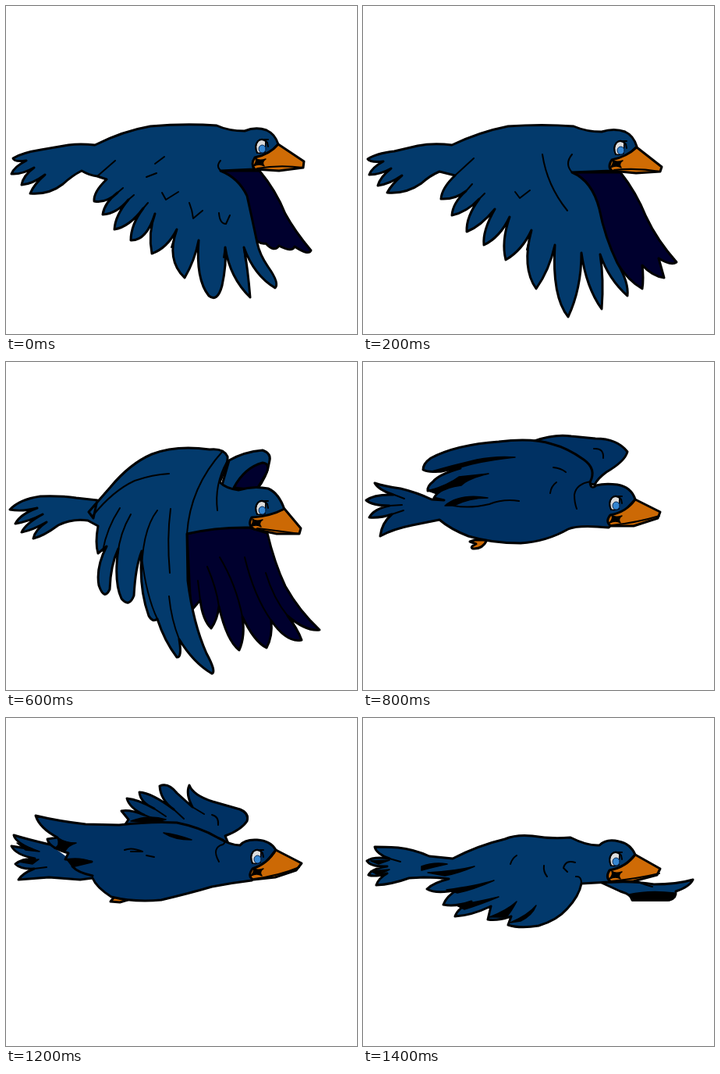
These frames come from a looping animation (450x420 px, 1600 ms). An HTML page:

```html
<!DOCTYPE html>
<html lang="en">
<head>
<meta charset="utf-8">
<title>Flying bird</title>
<style>
html, body { margin: 0; width: 100%; height: 100%; overflow: hidden; background: #fff; }
svg { display: block; width: 100vw; height: 100vh; }
path, ellipse { stroke: #000; stroke-width: 3; stroke-linejoin: round; stroke-linecap: round; }
.pose { visibility: hidden; animation: show 1.6s step-end infinite; animation-delay: calc(var(--i) * .2s - 1.6s); }
.skin { fill: var(--blue); }
.under { fill: #00002e; }
.beak { fill: var(--orange); }
.ink { fill: none; stroke-width: 2; }
.gap { fill: #000; stroke-width: 1.5; }
.white { fill: #ddd; stroke-width: 1.6; }
.iris { fill: #3585d0; stroke: #06244e; stroke-width: 1; }
@keyframes show {
  0% { visibility: visible; }
  12.5%, 100% { visibility: hidden; }
}
</style>
</head>
<body>
<svg viewBox="0 0 450 420" preserveAspectRatio="none">
<defs>
  <g id="eye">
    <path class="white" d="M-5 8Q-9 -1 -4 -7Q1 -12 6 -7L5 7Q0 9 -5 8Z"/>
    <ellipse class="iris" cx="1.5" cy="3" rx="4.5" ry="5"/>
    <path class="ink" d="M-5 8Q-9 -1 -4 -7Q2 -12 8 -5L9 0M4 -9L9 -9"/>
  </g>
  <path id="smile" class="gap" d="M-3 -5Q1 -1 10 -4Q4 0 8 5Q2 1 -6 5Q-1 0 -3 -5Z"/>
</defs>

<!-- downstroke -->
<g class="pose" style="--i:0;--blue:#033a6c;--orange:#cf6c06">
  <path class="under" d="M275 211L325 211Q346 236 358 266Q370 288 391 313Q388 320 370 308Q367 316 350 307Q344 316 333 304Q324 306 316 294Q308 245 275 211Z"/>
  <path class="skin" d="M114 178Q95 176 80 178L45 184Q20 188 9 195Q10 200 26 198Q10 206 7 215Q20 216 36 207Q22 217 20 229Q34 228 50 216Q36 228 31 240Q55 242 73 228Q85 217 97 211Q107 217 117 218L129 222Q112 238 113 250Q128 253 143 239Q126 252 124 267Q142 266 157 248Q140 268 139 286Q158 283 176 259Q160 280 160 300Q180 301 191 266Q182 290 187 317Q207 310 219 286Q205 325 229 348Q242 326 247 300Q243 350 260 371Q271 380 277 358Q283 330 281 309Q287 348 313 373Q310 336 305 309Q318 345 345 361Q351 355 336 334Q325 318 322 303Q315 270 309 243Q298 220 275 211L318 209L349 177Q345 164 334 159Q320 154 306 160Q285 160 270 153Q230 150 185 154Q150 160 114 178Z"/>
  <path class="beak" d="M349 177L382 199L381 207L350 211L319 209Q313 203 319 194Q338 190 349 177Z"/>
  <path class="ink" d="M322 208Q350 203 381 207M275 198Q268 206 277 212M117 218L140 198M191 202L203 193M180 219L193 214M200 239L205 248L221 238M235 252Q239 262 240 272L252 262M273 265Q274 279 282 279L287 268M219 286L212 309M281 309L279 322M305 309L307 326M143 239L150 233M157 248L164 242M176 259L182 252"/>
  <use href="#eye" x="327" y="180"/><use href="#smile" x="323" y="200"/>
</g>

<!-- wings deepest -->
<g class="pose" style="--i:1;--blue:#033a6c;--orange:#d06c04">
  <path class="under" d="M268 213L330 213Q350 238 363 270Q377 300 402 328Q395 333 379 323Q383 337 386 348Q371 346 358 332Q360 350 358 362Q340 352 325 328Q290 285 268 213Z"/>
  <path class="skin" d="M114 178Q90 175 70 179L40 186Q16 189 6 196Q10 201 26 199Q11 207 8 216Q22 216 36 208Q22 219 19 230Q34 228 50 217Q37 228 31 239Q55 241 75 227Q86 217 98 212L118 217Q101 233 100 247Q118 248 132 237Q115 252 114 268Q133 264 149 247Q132 270 133 289Q151 282 169 260Q153 288 155 306Q176 296 188 270Q177 302 183 325Q204 313 216 287Q203 335 222 362Q239 338 246 306Q242 372 263 398Q280 362 280 316Q286 360 306 388Q309 350 304 318Q315 350 339 371Q341 354 326 329Q310 296 303 260Q294 224 268 213L318 211L351 180Q347 166 336 161Q322 156 306 161Q286 161 270 154Q230 151 186 154Q150 161 114 178Z"/>
  <path class="beak" d="M351 181L383 206L381 212L350 214L319 211Q313 206 319 197Q338 193 351 181Z"/>
  <path class="ink" d="M322 210Q350 207 381 212M268 190Q258 202 268 213M118 217L142 195M230 190Q236 230 262 262M195 238L201 246L214 236M216 287L210 312M246 306L246 325M280 316L280 330M304 318L306 334M132 237L140 228M149 247L156 240"/>
  <use href="#eye" x="329" y="182"/><use href="#smile" x="323" y="202"/>
</g>

<!-- sweeping forward -->
<g class="pose" style="--i:2;--blue:#033a6c;--orange:#d86e00">
  <path class="skin" d="M270 149Q285 139 303 135Q322 140 336 153Q347 161 350 174L300 172Z"/>
  <path class="under" d="M298 154Q315 146 333 152Q345 159 349 171Q322 164 298 160Z"/>
  <path class="under" d="M262 218Q300 211 320 213L358 218Q370 242 379 268Q388 298 405 320Q396 322 386 312Q390 324 389 334L379 328Q386 338 386 346Q375 343 366 331Q369 353 363 377Q344 368 332 345Q290 290 262 218Z"/>
  <path class="skin" d="M112 180Q85 176 62 180L32 188Q14 190 6 197Q8 203 24 202Q12 208 9 216Q22 217 34 211Q19 221 15 232Q26 233 42 225Q34 232 30 241Q48 234 66 224Q82 214 105 215Q95 230 96 242Q109 242 125 228Q114 246 114 262Q126 259 142 242Q128 266 128 283Q144 277 164 256Q149 283 148 303Q164 295 182 268Q168 295 168 313Q185 303 203 278Q186 312 188 335Q203 328 218 304L211 340L221 331Q218 346 224 360Q241 340 248 309Q247 356 264 378Q278 352 280 315Q286 348 304 368Q311 352 304 318Q315 346 335 358Q333 325 313 290Q278 255 262 218Q290 211 319 214L361 195Q355 174 341 166Q316 161 296 162Q282 155 268 149Q247 147 235 143Q217 139 202 148L180 155Q145 164 112 180Z"/>
  <path class="beak" d="M361 193L383 217L377 221L348 219L321 215Q314 210 319 202Q343 202 361 193Z"/>
  <path class="ink" d="M318 208Q322 212 350 217L378 221M155 172Q128 190 105 215M224 181Q225 217 246 248Q261 268 275 282M246 147Q265 164 273 199M251 178Q253 198 259 213M125 228L136 213M142 242L151 231M164 256L171 247M182 268L190 258M218 304L226 296M248 309L249 316M280 315L281 301M304 318L301 312M358 222L366 245"/>
  <use href="#eye" x="332" y="187"/>
</g>

<!-- folding down -->
<g class="pose" style="--i:3;--blue:#033a6c;--orange:#cc6905">
  <path class="skin" d="M274 168L286 126Q305 115 329 113Q340 117 338 126Q335 147 321 164Z"/>
  <path class="under" d="M292 161Q306 135 329 129Q339 130 334 142L321 164Z"/>
  <path class="under" d="M232 220Q270 210 312 212L335 219Q344 257 358 287Q376 319 402 343Q384 345 361 325Q374 342 379 356Q360 360 340 331Q342 352 334 366Q318 358 303 326Q307 351 299 369Q283 357 273 313Q271 330 263 341Q252 330 249 305L237 319Z"/>
  <path class="skin" d="M117 177L90 174Q70 171 44 172Q17 176 5 189Q20 192 40 187Q18 195 12 207Q30 204 47 195Q25 207 20 218Q35 215 52 205Q37 215 35 226Q48 223 67 209Q85 200 105 203L118 210Q114 232 118 245L129 236Q115 263 119 286Q126 306 133 291Q134 260 144 239Q138 281 148 303Q158 315 164 299Q166 262 174 242Q170 290 183 325Q188 334 194 329Q203 357 219 378Q226 379 222 355Q240 385 264 399Q270 397 257 373Q240 335 233 280L232 220Q270 211 316 212L357 189Q350 168 336 162Q317 158 298 164Q282 162 274 154Q285 130 284 121Q279 110 261 112Q218 106 187 118Q159 130 134 160L106 192L112 200Z"/>
  <path class="beak" d="M357 188L378 213L376 220L347 220L318 214Q309 209 315 199Q338 198 357 188Z"/>
  <path class="ink" d="M322 213Q347 216 376 220M112 196Q137 165 165 152Q188 144 209 143M146 187Q129 213 124 242M160 195Q146 219 143 247M194 190Q173 217 174 279M211 188Q206 226 210 270M232 220Q236 160 278 114M283 128Q267 157 271 190M174 250Q180 300 194 329M209 300Q212 330 222 355M249 305L246 280M273 313Q270 290 258 262M303 326Q295 285 274 250M340 331Q318 300 306 250M361 325Q343 303 333 270"/>
  <use href="#eye" x="327" y="187"/><use href="#smile" x="319" y="206"/>
</g>

<!-- recovery -->
<g class="pose" style="--i:4;--blue:#003163;--orange:#cc6905">
  <path class="skin" d="M220 101Q245 92 267 95L298 98Q326 98 339 115Q336 127 312 141Q301 149 297 157L260 150Z"/>
  <path class="beak" d="M143 228L159 228Q153 240 141 239Q136 237 145 233L137 230Z"/>
  <path class="skin" d="M104 177L88 176Q69 167 48 162Q27 159 15 155Q20 164 39 170Q15 169 4 177Q12 184 34 184Q14 188 8 199Q23 200 37 195Q24 206 22 223Q38 214 63 209L98 202Q112 214 135 223Q165 232 202 232Q235 230 263 214Q276 208 315 212L349 176Q344 160 326 157Q310 155 299 158Q292 164 291 154Q300 137 283 125Q262 110 242 105Q217 97 174 102Q119 106 87 123Q77 130 77 138Q87 143 107 138L125 136Q97 144 90 153Q82 159 83 165L104 162Q94 168 91 174Z"/>
  <path class="gap" d="M88 140Q116 132 146 125Q171 120 195 122Q165 125 139 131Q114 138 100 141ZM84 165Q110 157 123 147L161 143Q135 149 126 158Q107 160 95 169ZM105 184Q124 168 160 174Q136 174 116 184Z"/>
  <path class="beak" d="M349 176L381 192L378 200L347 210L318 210Q310 205 317 196Q338 192 349 176Z"/>
  <path class="ink" d="M319 209Q350 206 380 197M292 153Q273 156 271 170Q271 180 274 188M116 184Q137 188 162 182Q180 175 200 178M248 154Q241 159 240 168M244 135Q254 136 260 141M296 111Q309 110 308 123M40 170L53 175M34 184L50 183M37 195L52 190"/>
  <use href="#eye" x="323" y="181"/><use href="#smile" x="322" y="201"/>
</g>

<!-- wings raised -->
<g class="pose" style="--i:5;--blue:#003163;--orange:#cc6905">
  <path class="skin" d="M218 142L220 87Q217 62 225 45Q235 55 239 72Q238 43 248 28Q260 42 263 66Q269 43 280 34Q288 51 289 72Q309 82 314 105Q313 130 296 158Z"/>
  <path class="beak" d="M141 229L157 229Q150 241 139 239Q135 236 144 233Z"/>
  <path class="skin" d="M103 177L83 174Q61 165 43 160Q23 157 12 153Q17 162 37 168Q13 167 3 174Q13 181 33 182Q15 186 9 196Q22 198 37 194Q23 203 20 216Q39 211 63 207L98 203Q113 216 136 225Q165 233 204 232Q238 228 263 215Q278 209 315 210L348 173Q342 160 325 157Q310 155 298 160Q292 136 279 117Q263 92 246 73Q230 44 214 15Q203 17 205 45Q190 25 176 22Q172 36 182 58Q163 39 147 38Q147 54 163 75Q143 61 127 61Q130 80 151 96Q131 87 116 88Q121 107 145 118Q128 114 116 117Q125 137 151 147Q124 158 103 177Z"/>
  <path class="beak" d="M348 173L380 190L377 198L346 208L318 208Q310 203 316 195Q337 190 348 173Z"/>
  <path class="ink" d="M319 207Q349 204 379 194M205 45Q211 63 221 78M182 58Q190 75 203 89M163 75Q174 91 188 101M151 96Q162 108 177 114M145 118Q157 127 172 130M298 160Q277 158 272 185M207 121L219 133M232 105L243 119M239 72L245 88M263 66L268 83M151 147Q170 141 184 145M118 186Q145 192 166 184"/>
  <use href="#eye" x="322" y="180"/><use href="#smile" x="321" y="199"/>
</g>

<!-- wings swept back -->
<g class="pose" style="--i:6;--blue:#003163;--orange:#cc6905">
  <path class="skin" d="M153 136L157 130L148 119Q159 117 177 124Q158 115 155 103Q169 104 190 116Q172 108 171 95Q187 96 215 117Q198 105 197 87Q208 82 219 96L239 114Q230 97 235 86Q240 99 265 107L300 117Q312 122 309 132Q302 143 281 151L286 163L230 150Z"/>
  <path class="beak" d="M139 229L156 233L146 236L134 235Z"/>
  <path class="skin" d="M56 162Q30 156 10 150Q12 159 33 168L7 164Q12 175 37 180Q20 180 12 187Q19 194 36 193Q21 199 16 207L55 204L95 207L111 205Q116 217 135 229Q163 236 199 233Q237 224 264 216Q290 211 315 208L346 169Q339 157 322 156Q306 155 300 163Q288 163 271 153Q249 140 219 134Q187 132 145 137L102 136Q67 132 38 125Q43 141 66 153L53 155Q55 166 80 173L76 181Q94 182 110 184L85 190Q92 198 111 202"/>
  <path class="gap" d="M66 153Q76 160 90 160Q80 163 76 170L62 167Q70 164 66 153ZM78 181Q94 178 110 184Q97 187 85 190ZM202 147Q219 149 238 156Q216 156 202 147ZM160 132Q183 123 205 130L190 134ZM14 160L43 171L25 169ZM16 184L42 181L34 187Z"/>
  <path class="beak" d="M346 169L379 186L372 195L345 204L317 207Q309 203 316 193Q335 187 346 169Z"/>
  <path class="ink" d="M318 206Q350 202 376 191M271 153Q285 157 278 162Q263 166 273 184M152 169Q161 165 175 171L160 171M180 176L190 178M264 124Q273 126 272 137M177 124L192 130M190 116L205 126M215 117L228 129M239 114L254 123M36 193L52 191"/>
  <use href="#eye" x="321" y="178"/><use href="#smile" x="320" y="197"/>
</g>

<!-- level wings -->
<g class="pose" style="--i:7;--blue:#02396c;--orange:#cf6b06">
  <path class="skin" d="M306 211Q345 208 373 213Q402 213 423 207Q419 216 401 222Q402 231 393 233L345 233Q344 226 330 222Z"/>
  <path class="gap" d="M341 226Q367 220 399 224Q401 232 391 234L345 234Z"/>
  <path class="skin" d="M115 180L85 177Q65 168 45 166Q27 165 15 165Q17 174 34 180Q13 177 5 183Q10 191 31 190Q11 193 7 201Q15 204 31 199Q20 205 17 214Q37 213 59 205L78 204Q95 204 110 206Q90 211 82 219Q94 226 121 220Q107 228 103 239Q119 242 139 235Q121 244 118 254Q139 253 164 241L160 258Q172 260 190 254L186 265Q201 270 225 266Q249 259 262 244Q277 228 280 212L316 210L349 175Q343 161 328 158Q312 154 303 163Q288 164 266 153Q240 155 217 151Q196 149 182 155Q148 163 115 180Z"/>
  <path class="gap" d="M75 190Q91 184 108 187Q90 191 75 195ZM83 198Q119 196 143 190Q122 199 105 202ZM107 220Q145 215 168 208Q141 220 121 224ZM120 240Q149 235 174 229Q150 239 130 245ZM162 255Q185 246 197 235Q190 248 184 255ZM189 262Q212 252 222 240Q217 253 202 260ZM10 183L34 182L20 187ZM10 196L34 194L20 201Z"/>
  <path class="beak" d="M349 175L381 193L377 201L347 209L318 210Q310 205 316 195Q337 191 349 175Z"/>
  <path class="ink" d="M318 209Q350 206 380 199M280 212Q280 202 273 203M257 192Q260 181 272 185M257 192L262 197M197 176Q191 180 189 187M232 189Q231 197 236 203M351 209Q362 214 371 216M34 180L48 184"/>
  <use href="#eye" x="323" y="181"/><use href="#smile" x="322" y="201"/>
</g>
</svg>
</body>
</html>
```
